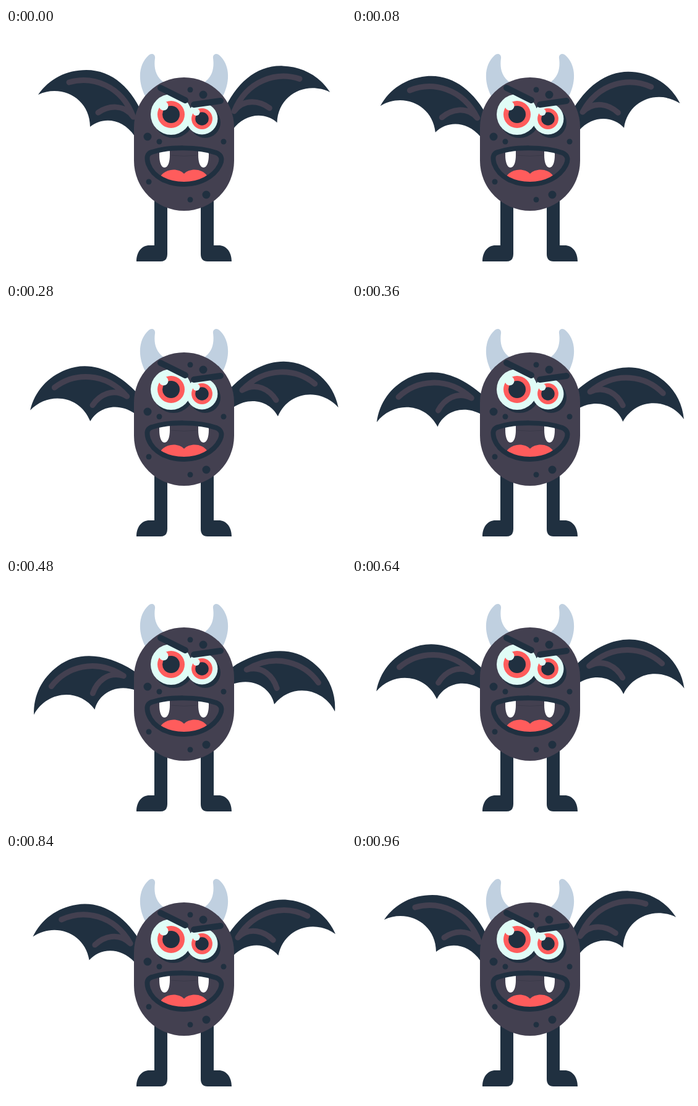
Animation of 550 by 400 pixels, one loop 1000 ms. Source, as an HTML page:

```html
<!DOCTYPE html>
<html lang="en">
<head>
<meta charset="utf-8">
<title>Flapping monster</title>
<style>
  html, body { margin: 0; width: 100%; height: 100%; overflow: hidden; background: #fff; }
  svg { display: block; width: 100%; height: 100%; }
  .dark { fill: #203040; }
  .skin { fill: #434050; }
  .horn { fill: #c0d0e0; }
  .red { fill: #ff5c5c; }
  .mint { fill: #e0fcf6; }
  .line { fill: none; stroke: #203040; stroke-linecap: round; }
  .bone { fill: none; stroke: #434050; stroke-width: 9; stroke-linecap: round; }
</style>
</head>
<body>
<svg viewBox="0 0 550 400">
  <defs>
    <g id="wing">
      <path class="dark" d="M52 108C70 82 98 68 130 68C172 68 205 98 224 147L230 168L228 178L208 175C188 145 155 144 136 160C136 114 90 90 52 108Z"/>
      <path class="bone" d="M102 88C140 77 187 93 206 144M149 137C165 126 190 122 206 144"/>
    </g>
    <g id="side">
      <path class="dark" d="M240 270H261V366Q261 378 250 378H211C211 362 220 352 232 352H240Z"/>
      <path class="horn" d="M231 44C215 58 212 84 225 110L262 92C241 82 239 64 241 49C242 42 235 40 231 44Z"/>
    </g>
    <g id="eye">
      <circle class="mint" r="33"/>
      <circle class="red" r="22"/>
      <circle class="dark" r="14"/>
      <circle class="mint" cx="-12" cy="-14" r="7.5"/>
    </g>
  </defs>

  <g id="left"><use href="#wing"/></g>
  <g id="right"><use href="#wing" transform="translate(580 -2) rotate(2) scale(-1 1)"/></g>

  <use href="#side"/>
  <use href="#side" transform="translate(576 0) scale(-1 1)"/>
  <rect class="skin" x="207" y="80" width="162" height="216" rx="81"/>
  <g id="spots" class="dark"></g>

  <g class="dark">
    <circle cx="271" cy="145" r="33"/>
    <circle cx="322" cy="153" r="25"/>
  </g>
  <use href="#eye" transform="translate(267 140)"/>
  <use href="#eye" transform="translate(317 147) scale(.77)"/>
  <path class="line" stroke-width="10" d="M250 97L290 117M304 124L347 118"/>

  <path fill="none" stroke="#3a3a49" d="M267 206Q288 209 309 206"/>
  <path class="red" d="M250 240C258 228 278 226 288 236C298 226 318 228 325 239C314 247 302 251 288 251C274 251 260 247 250 240Z"/>
  <path fill="#fff" d="M248 197H265V206C265 217 262 226 256.500 226S248 217 248 206ZM311 197H328V206C328 217 325 226 319.500 226S311 217 311 206Z"/>
  <path class="line" stroke-width="8" d="M236 201C262 192 312 192 340 202C350 206 350 214 346 222C336 242 312 253 288 253C262 253 238 242 230 220C227 210 228 203 236 201Z"/>
</svg>
<script>
  const $ = id => document.getElementById(id);

  const spots = [[298, 100, 4.5], [319, 108, 6.5], [229, 176, 6.5], [248, 184, 4.5],
                 [352, 184, 4.5], [231, 249, 4.5], [298, 278, 4.5], [324, 270, 6.5]];
  $('spots').innerHTML = spots
    .map(([x, y, r]) => `<circle cx="${x}" cy="${y}" r="${r}"/>`).join('');

  const LOOP = 1000, STEP = 40, HALF = 12, SWING = 36.6;

  // Wings drop for twelve equal steps, then rise for twelve.
  function draw(now) {
    const step = Math.floor(now % LOOP / STEP);
    const angle = SWING * (1 - Math.abs(step - HALF) / HALF);
    $('left').setAttribute('transform', `rotate(${-angle} 220 175)`);
    $('right').setAttribute('transform', `rotate(${angle} 358.5 172)`);
  }

  let start;
  function tick(now) {
    start ??= now;
    draw(now - start);
    requestAnimationFrame(tick);
  }
  draw(0);
  requestAnimationFrame(tick);
</script>
</body>
</html>
```
